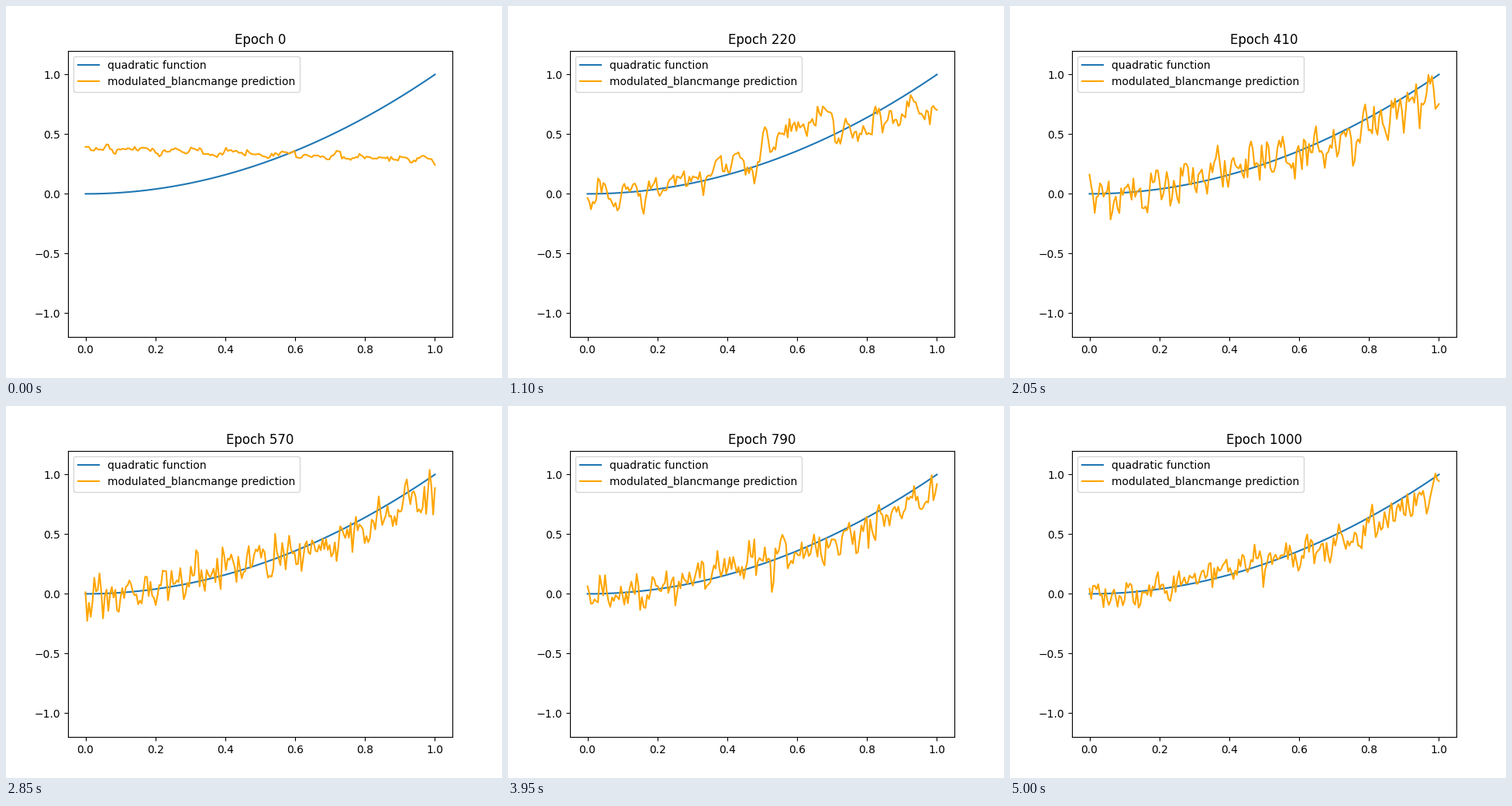
Write a matplotlib script that moves like this. It is 640 px wide and 480 px high and loops after 5.05 s.

```python
import numpy as np
import matplotlib.pyplot as plt
from matplotlib.animation import FuncAnimation

FRAMES, INTERVAL, STEP = 101, 50, 10
x = np.linspace(0, 1, 200)
rng = np.random.default_rng(7)


def make_waves(low, high, count, pace):
    freq = rng.uniform(low, high, count)
    phase = rng.uniform(0, 1, count)
    drift = rng.normal(0, pace, count)
    weight = rng.normal(0, 1, count) / np.sqrt(freq)
    return freq, phase, drift, weight


steps = make_waves(3, 18, 10, 0.06)
ripples = make_waves(8, 98, 50, 0.15)


def cycles(waves, i):
    freq, phase, drift, _ = waves
    return (np.outer(x, freq) + phase + drift * i) % 1


def unit(v):
    return (v - v.mean()) / v.std()


def trend(epoch):
    """Flat start that settles on the parabola with a small lasting misfit."""
    learned = 1 - np.exp(-epoch / 50)
    overshoot = np.exp(-((epoch - 220) / 90) ** 2)
    start = 0.385 - 0.1 * x
    misfit = 0.1 * np.sqrt(x) * np.sin(2 * np.pi * (x - 0.19) / 0.75)
    droop = (0.2 + 0.15 * overshoot) * x ** 12
    bump = 0.28 * overshoot * np.exp(-((x - 0.63) / 0.1) ** 2)
    return start + learned * (x ** 2 + misfit - droop + bump - start)


def noise(i):
    """Sawtooth plateaus early on, fine triangle ripples later."""
    epoch = i * STEP
    saw = unit((cycles(steps, i) - 0.5) @ steps[3])
    tri = unit(np.abs(cycles(ripples, i) - 0.5) @ ripples[3])
    rough = np.interp(epoch, [150, 380], [0.2, 0.85])
    size = np.interp(epoch, [0, 60, 400, 1000], [0.018, 0.05, 0.1, 0.07])
    return size * unit((1 - rough) * saw + rough * tri)


def prediction(i):
    return trend(i * STEP) + noise(i)


fig, ax = plt.subplots(figsize=(6.4, 4.8), dpi=100)
ax.plot(x, x ** 2, label="quadratic function")
line, = ax.plot(x, prediction(0), color="orange",
                label="modulated_blancmange prediction")
ax.set_xlim(-0.05, 1.05)
ax.set_ylim(-1.2, 1.2)
ax.legend(loc="upper left")
title = ax.set_title("Epoch 0")


def update(i):
    line.set_ydata(prediction(i))
    title.set_text(f"Epoch {i * STEP}")
    return line, title


anim = FuncAnimation(fig, update, frames=FRAMES, interval=INTERVAL,
                     init_func=lambda: update(0), repeat=True, repeat_delay=0)
plt.show()
```
